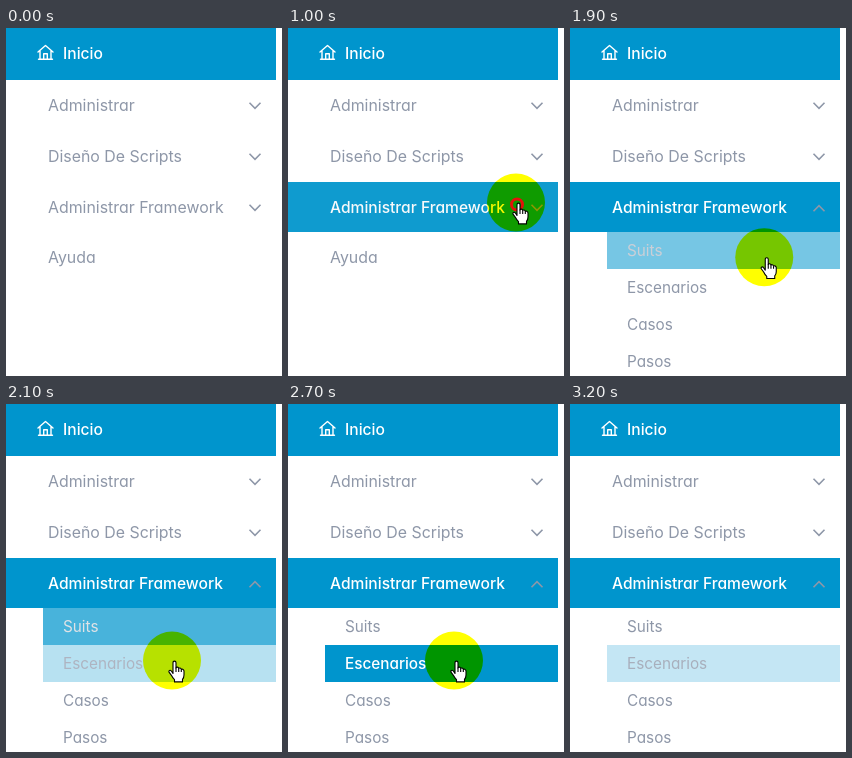
An HTML page that plays this animation: 276 px wide and 348 px high, repeating every 3500 ms.

```html
<!DOCTYPE html>
<html lang="es">
<head>
<meta charset="utf-8">
<title>Menú</title>
<style>
  :root { --blue: 0 149 205; --grey: #8e97a8; }
  html, body { margin: 0; width: 100%; height: 100%; overflow: hidden; background: #fff; }
  .stage {
    position: relative; width: 276px; height: 348px; overflow: hidden;
    background: #fff; isolation: isolate;
    font: 400 15.9px Inter, "Open Sans", sans-serif;
    font-feature-settings: "cv11";
  }
  .row {
    --h: 0;
    position: relative; box-sizing: border-box;
    width: 270px; height: 50.8px; padding-left: 42px;
    line-height: 51px; white-space: nowrap;
    background: rgb(var(--blue) / var(--h));
    color: color-mix(in srgb, #fff calc(var(--h) * 100%), var(--grey));
  }
  .row.strong { font-weight: 500; font-size: 15.6px; }
  .home { --h: 1; height: 52px; padding-left: 57px; }
  .home svg { position: absolute; left: 31px; top: 16px; }
  .sub { height: 0; overflow: hidden; }
  .sub .row, .sub .row.strong {
    width: 233px; height: 37px; margin-left: 37px; padding-left: 20px;
    line-height: 37px; font-size: 15.3px;
  }
  .chevron { position: absolute; left: 242px; top: 19px; stroke: var(--grey); stroke-width: 1.6; }
  svg { fill: none; overflow: visible; }
  .pointer { position: absolute; left: 0; top: 0; }
  .halo {
    position: absolute; left: -29px; top: -29px; width: 58px; height: 58px;
    border-radius: 50%; background: #ff0;
  }
  .blend { mix-blend-mode: multiply; }
  .hand { position: absolute; left: -4px; top: 0; }
  .ring {
    position: absolute; left: -6px; top: -5px; box-sizing: border-box;
    width: 14px; height: 14px; border: 3px solid #e3120b; border-radius: 50%;
  }
</style>
</head>
<body>
<div class="stage">
  <div class="row home strong">
    <svg width="17" height="17" stroke="#fff" stroke-width="1.4" stroke-linejoin="round" stroke-linecap="round">
      <path d="M1 8 8.5 1.5 16 8M3 6.8V15.3H14V6.8M6.7 15V9.8H10.3V15M1.5 15.3H15.5"/>
    </svg>Inicio
  </div>
  <div class="row">Administrar<svg class="chevron" width="14" height="14"><path/></svg></div>
  <div class="row">Diseño De Scripts<svg class="chevron" width="14" height="14"><path/></svg></div>
  <div class="row" id="framework">Administrar Framework<svg class="chevron" width="14" height="14"><path/></svg></div>
  <div class="sub">
    <div class="row" id="suits">Suits</div>
    <div class="row" id="escenarios">Escenarios</div>
    <div class="row">Casos</div>
    <div class="row">Pasos</div>
  </div>
  <div class="row">Ayuda</div>

  <div class="pointer blend"><div class="halo"></div></div>
  <div class="pointer">
    <div class="ring"></div>
    <svg class="hand" width="17" height="22" stroke="#000" stroke-width="1.1" stroke-linejoin="round">
      <path fill="#fff" d="M5 13V2.2Q5 .6 6.5 .6T8 2.2V7.4Q8.3 6.5 9.4 6.6T10.7 8Q11 7.3 12 7.5T13.3 9Q13.7 8.4 14.7 8.7T16 10.3V14.5Q16 17 14.5 18.8V21.4H6.5V19.2Q4.6 17.4 3.4 14.8L1 11.6Q.5 10.4 1.5 9.9T3.5 10.8Z"/>
      <path d="M8 7V11.5M10.7 8V11.5M13.3 9V11.5"/>
    </svg>
  </div>
</div>
<script>
  const LOOP = 3500, TICK = 100, LAST = 3200;
  const SHOW = 700, CLICK = 1000, HIDE = 3000, FADE = 400;
  const $ = s => document.querySelector(s);
  const $$ = s => document.querySelectorAll(s);

  const span = (t, from, to) => Math.min(1, Math.max(0, (t - from) / (to - from)));
  const smooth = p => p * p * (3 - 2 * p);
  const fade = (t, from) => smooth(span(t, from, from + FADE));

  // The pointer comes in, goes down the submenu, then leaves
  function pointerAt(t) {
    const rest = (1 - span(t, SHOW, CLICK)) ** 2;
    const down = span(t, 1500, 2100);
    const leave = span(t, 2700, HIDE) ** 1.5;
    return [
      228 + 29 * rest - 62 * down ** 1.5 + 60 * leave,
      174.5 - 5 * rest + 82 * down + 70 * leave
    ];
  }

  function setHover(id, t, enter, exit = Infinity) {
    const row = $(id);
    const h = fade(t, enter) - (t > exit ? fade(t, exit) : 0);
    row.style.setProperty('--h', h);
    row.classList.toggle('strong', h > .9);
  }

  function draw(t) {
    setHover('#framework', t, 660);
    setHover('#suits', t, 1690, 1960);
    setHover('#escenarios', t, 1960, 2925);

    const open = smooth(span(t, CLICK, CLICK + 300));
    $('.sub').style.height = 148 * open + 'px';
    $('#framework .chevron').style.transform = `rotate(${-180 * open}deg)`;

    const [x, y] = pointerAt(t);
    for (const el of $$('.pointer')) {
      el.style.transform = `translate(${x}px, ${y}px)`;
      el.style.visibility = t >= SHOW && t < HIDE ? 'visible' : 'hidden';
    }
    $('.ring').style.display = t >= CLICK && t < CLICK + 200 ? 'block' : 'none';
  }

  for (const p of $$('.chevron path')) p.setAttribute('d', 'M1.5 3.8 7 9.3 12.5 3.8');

  const start = performance.now();
  function frame() {
    const t = (performance.now() - start) % LOOP;
    draw(Math.min(LAST, Math.floor(t / TICK) * TICK));
    requestAnimationFrame(frame);
  }
  frame();
</script>
</body>
</html>
```
